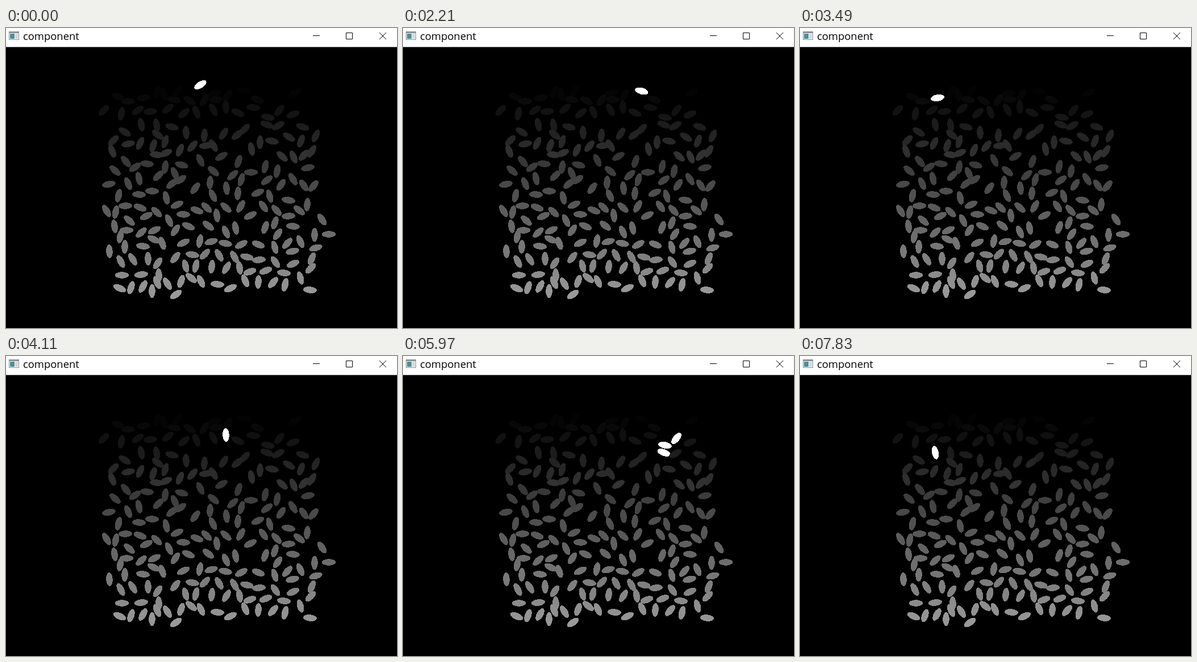
An HTML page that plays this animation: 688x528 px, repeating every 8000 ms.

```html
<!DOCTYPE html>
<html lang="en">
<head>
<meta charset="utf-8">
<title>component</title>
<style>
  html, body { margin: 0; width: 100%; height: 100%; overflow: hidden; background: #000; }
  svg { display: block; }
  text { font: 18.4px "Open Sans", "Noto Sans", sans-serif; }
</style>
</head>
<body>
<svg id="stage" width="688" height="528" viewBox="0 0 688 528">
  <rect width="688" height="528"/>
  <rect width="688" height="33.5" fill="#fff"/>
  <g shape-rendering="crispEdges">
    <rect x="5" y="6" width="18" height="15" fill="#8b9096"/>
    <rect x="6" y="9" width="16" height="11" fill="#f4f6f7"/>
    <rect x="7" y="10" width="8" height="9" fill="#4d8f95"/>
    <rect x="16" y="10" width="5" height="9" fill="#d5dadd"/>
  </g>
  <text x="30" y="21">component</text>
  <path d="M540 13.5h12M598.5 8.5h11v11h-11zM657 8l12 12M669 8l-12 12" fill="none" stroke="#000"/>
  <g id="grains" shape-rendering="crispEdges"></g>
</svg>
<script>
const LOOP = 8000;

// Components in scan order; each grain is x, y, angle.
const parts = [
  [342,100,-33], [209,104,10], [405,104,-15], [467,104,10],
  [302,111,-55, 296,126,10, 323,128,30],
  [266,113,-70, 278,117,80],
  [420,111,15], [508,114,-25],
  [367,115,-12, 349,127,-55, 369,126,0, 390,118,-55],
  [197,121,20, 215,129,0],
  [242,123,-8], [442,126,20], [387,139,88], [285,142,-40],
  [365,144,62], [172,145,-45], [435,140,5], [335,148,70],
  [481,145,-50, 461,157,10, 459,170,20],
  [232,145,-35], [203,151,-80], [254,147,-5],
  [313,150,-40], [505,152,-20], [238,170,78]
];

// When each component lights up, in ms.
const starts = [0, 620, 940, 1250, 1560, 1870, 2210, 2490, 2830, 3160, 3490, 3790, 4110,
  4440, 4730, 5050, 5370, 5660, 5970, 6270, 6590, 6900, 7230, 7540, 7830];

// Grains along the outline of the heap.
const rim = [
  408,149,25, 545,190,-65, 181,275,-10, 177,322,60, 556,337,55, 568,363,0,
  543,364,90, 545,387,-15, 182,393,88, 328,399,8, 204,435,0, 372,451,5,
  395,458,-25, 535,461,5, 257,463,90, 299,469,-35
];

const layer = document.getElementById("grains");
const placed = [];

function shade(y) {
  const v = Math.max(0, Math.round((y - 104) * 0.42));
  return `rgb(${v},${v},${v})`;
}

function addGrain(x, y, angle) {
  const el = document.createElementNS("http://www.w3.org/2000/svg", "ellipse");
  const attrs = { rx: 12, ry: 5.8, fill: shade(y),
    transform: `translate(${x} ${y}) rotate(${angle})` };
  for (const key in attrs) el.setAttribute(key, attrs[key]);
  layer.append(el);
  placed.push([x, y]);
  return { el, fill: attrs.fill };
}

function addAll(list) {
  const out = [];
  for (let i = 0; i < list.length; i += 3) out.push(addGrain(...list.slice(i, i + 3)));
  return out;
}

let seed = 4711;
function random() {
  seed = (seed * 16807) % 2147483647;
  return seed / 2147483647;
}

// Fill the heap: of several random spots, keep the one with most room.
function scatter(count) {
  for (let n = 0; n < count; n++) {
    let best, room = -1;
    for (let k = 0; k < 14; k++) {
      const x = 187 + random() * 358, y = 170 + random() * 288;
      const gap = Math.min(...placed.map(p => Math.hypot(p[0] - x, p[1] - y)));
      if (gap > room) { room = gap; best = [x, y]; }
    }
    addGrain(Math.round(best[0]), Math.round(best[1]), Math.round(random() * 180));
  }
}

const groups = parts.map(addAll);
addAll(rim);
scatter(156);

let lit = -1;
function paint(i, white) {
  for (const g of groups[i]) g.el.setAttribute("fill", white ? "#fff" : g.fill);
}

const begin = performance.now();
function frame() {
  const t = (performance.now() - begin) % LOOP;
  const now = starts.filter(s => s <= t).length - 1;
  if (now !== lit) {
    if (lit >= 0) paint(lit, false);
    paint(now, true);
    lit = now;
  }
  requestAnimationFrame(frame);
}
frame();
</script>
</body>
</html>
```
